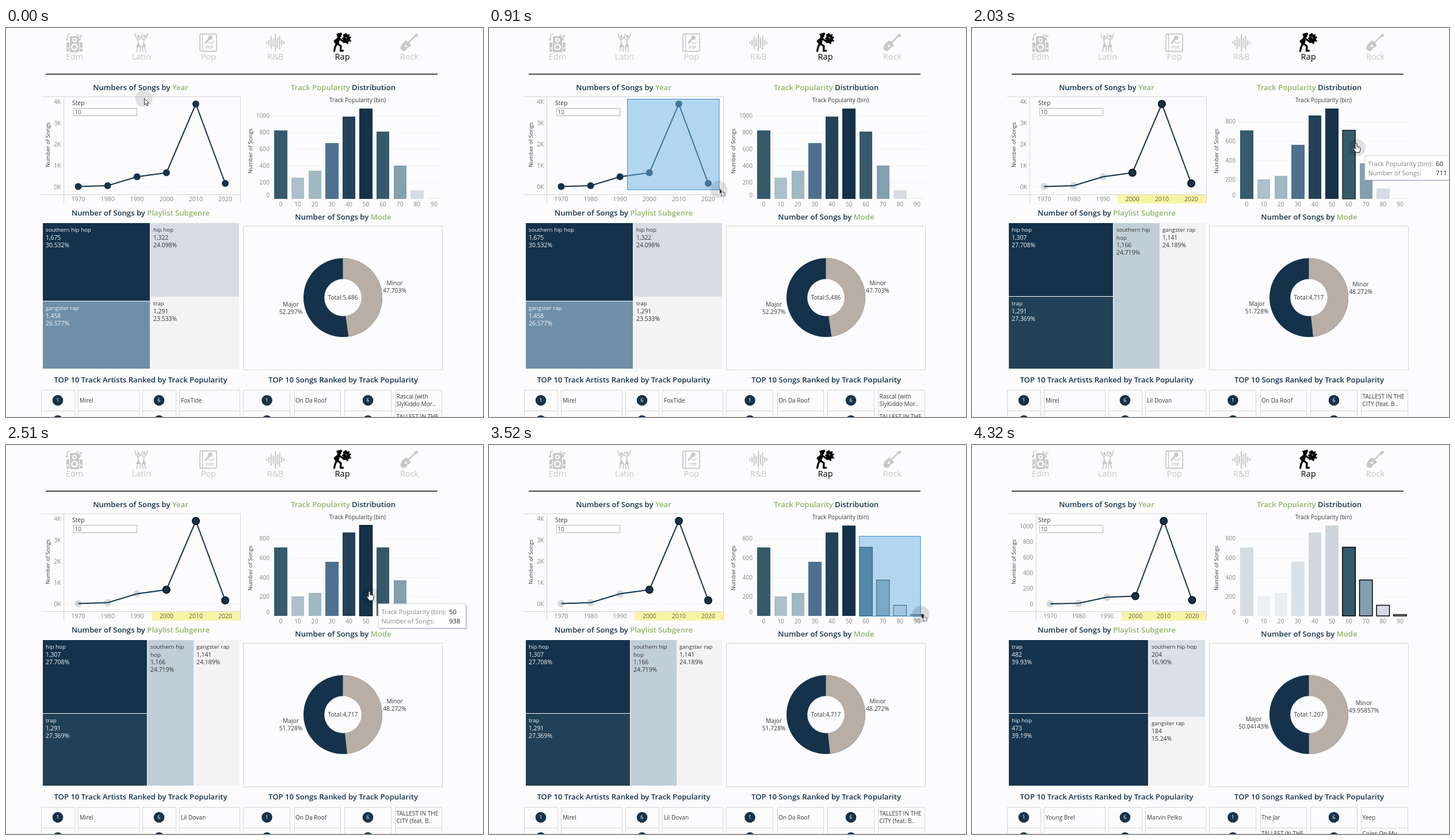
Write an HTML page that moves like this. It is 829 px wide and 676 px high and loops after 4900 ms.

```html
<!DOCTYPE html>
<html lang="en">
<head>
<meta charset="utf-8">
<title>Song dashboard</title>
<style>
html, body { margin: 0; width: 100%; height: 100%; overflow: hidden; background: #fcfcfe; }
svg { display: block; width: 829px; height: 676px; font-family: "Open Sans", "Noto Sans", sans-serif; }
.crisp { shape-rendering: crispEdges; }
.halo { stroke: #fcfcfe; stroke-width: 2; paint-order: stroke; }
</style>
</head>
<body>
<svg viewBox="0 0 829 676"><g id="base"></g><g id="live"></g></svg>
<script>
const LOOP = 4900, NAVY = '#15324a', GREEN = '#8fb568', TAN = '#b8aea5', LINE = '#d4d4d6', GREY = '#858585', INK = '#3a3a3e';

const lerp = (a, b, p) => a + (b - a) * p;
const mixAll = (a, b, p) => a.map((v, i) => lerp(v, b[i], p));
const clamp01 = v => Math.max(0, Math.min(1, v));
const smooth = v => v * v * (3 - 2 * v);
const easeInOut = x => x < .5 ? 4 * x ** 3 : 1 - 4 * (1 - x) ** 3;
const rgb = hex => [1, 3, 5].map(i => parseInt(hex.slice(i, i + 2), 16));
const mixHex = (a, b, p) => `rgb(${mixAll(rgb(a), rgb(b), p).map(Math.round)})`;
const esc = s => String(s).replace(/&/g, '&amp;');

const text = (x, y, s, size, fill = INK, anchor = 'start', more = '') =>
  `<text x="${x}" y="${y}" font-size="${size}" fill="${fill}" text-anchor="${anchor}" ${more}>${esc(s)}</text>`;
const rect = (x, y, w, h, fill, more = '') =>
  `<rect x="${x}" y="${y}" width="${Math.max(0, w)}" height="${Math.max(0, h)}" fill="${fill}" ${more}/>`;
const circle = (x, y, r, fill, more = '') => `<circle cx="${x}" cy="${y}" r="${r}" fill="${fill}" ${more}/>`;
const path = (d, stroke, w = 1, fill = 'none', more = '') =>
  `<path d="${d}" stroke="${stroke}" stroke-width="${w}" fill="${fill}" ${more}/>`;
const title = (x, y, parts) => `<text x="${x}" y="${y}" font-size="13.15" font-weight="600" text-anchor="middle">` +
  parts.map(([s, c]) => `<tspan fill="${c}">${s}</tspan>`).join('') + '</text>';

// ---- data for the three filter states ----
const SUBGENRES = ['trap', 'southern hip hop', 'hip hop', 'gangster rap'];
const TREES = [
  [[[251, 467.5, 405, 592], '#f3f3f4', '1,291', '23.533%'],
   [[64, 339, 250, 474], '#15324a', '1,675', '30.532%'],
   [[251, 339, 405, 467], '#d7dbe6', '1,322', '24.098%'],
   [[64, 475, 250, 592], '#6f8fa8', '1,458', '26.577%']],
  [[[64, 467, 245, 592], '#224056', '1,291', '27.369%'],
   [[246, 339, 326, 592], '#c0ced7', '1,166', '24.719%'],
   [[64, 339, 245, 466], '#15324a', '1,307', '27.708%'],
   [[326, 339, 405, 592], '#f3f3f4', '1,141', '24.189%']],
  [[[64, 339, 306, 466], '#15324a', '482', '39.93%'],
   [[307, 339, 405, 472], '#d9e0e8', '204', '16.90%'],
   [[64, 467, 306, 592], '#183650', '473', '39.19%'],
   [[307, 472, 405, 592], '#f3f3f4', '184', '15.24%']]
];
const BARS_ALL = [825, 256, 340, 672, 991, 1091, 811, 402, 106, 14];
const BARS_SEL = [707, 203, 239, 560, 863, 938, 711, 372, 110, 14];
const BAR_TINT = ['#365a6b', '#adc0cc', '#a0b8c1', '#4e708e', '#234158', NAVY, '#365a6b', '#84a0ae', '#d7dbe6', '#f3efe8'];
const LINES = [
  { axis: 100, x: [125.5, 51.1], y: [275.5, 274, 258.5, 251.5, 132, 270], ticks: ['0K', '1K', '2K', '3K', '4K'], gap: 36.9 },
  { axis: 111, x: [136, 49.3], y: [276, 275, 264.5, 262.5, 132, 269.5], ticks: [0, 200, 400, 600, 800, 1000], gap: 26.95 }
];
const DONUTS = [
  { minor: .47703, total: '5,486', major: ['52.297%', 495, 484], min: ['47.703%', 675.5, 447] },
  { minor: .48272, total: '4,717', major: ['51.728%', 495, 483], min: ['48.272%', 675.5, 448.5] },
  { minor: .4995857, total: '1,207', major: ['50.04143%', 489.5, 480], min: ['49.95857%', 681, 452] }
];
const TALL = ['TALLEST IN THE', 'CITY (feat. B..'];
// first row of the four columns, then any second row that peeks in
const LISTS = [
  { top: [['Mirel'], ['FoxTide'], ['On Da Roof'], ['Rascal (with', 'SlyKiddo Mor..']], next: [678.5, TALL[0], 679] },
  { top: [['Mirel'], ['Lil Dovan'], ['On Da Roof'], TALL] },
  { top: [['Young Brel'], ['Marvin Pelko'], ['The Jar'], ['Yeep']], next: [678.5, 'Coins On My..', 679], left: [503, TALL[0], 679] }
];
const BADGE_X = [90, 266, 453.5, 629], NAME_X = [128, 304, 503, 678.5];

// ---- fixed parts ----
function icons() {
  const g = '#c8c8c8', w = '#fcfcfe', k = '#000', round = 'stroke-linejoin="round" stroke-linecap="round"';
  let s = rect(111, 14, 16, 28, g, 'rx="2"') + circle(119, 21, 4, w) + circle(119, 21, 2, g) + circle(119, 33, 6, w) + circle(119, 33, 3.5, g);
  s += rect(105, 25, 5, 16, g) + rect(128, 25, 5, 16, g) + circle(107.5, 35, 1.6, w) + circle(130.5, 35, 1.6, w);
  s += path('M107 20V12l5-2M129 20v-7l4 2M122 12h5', g, 1.6) + circle(106, 20, 2, g) + circle(128, 20, 2, g);
  s += circle(230, 15, 2.4, g) + circle(240.5, 14.5, 2.4, g);
  s += path('M224 10l2 7 4 3 4-3 3-6M246 10l-2 7-4 3-4-2M229 20l1 8-3 13M231 28l3 5-1 8M240 20l-1 8 4 13M239 28l-2 6 1 7', g, 1.7, 'none', round);
  s += path('M230 25l-3.5 8h7zM239.5 25l-3 8h7z', g, .6, g);
  s += rect(337, 10.5, 29, 30, 'none', `rx="2" stroke="${g}" stroke-width="1.8"`) + path('M341.5 10v30', g, 1.5);
  s += circle(355, 17, 3.8, g) + path('M353 19l-7 8', g, 3) + path('M352 24q6 6 9-1', g, 1.2);
  s += text(354, 36, 'POP', 6.5, g, 'middle', 'font-weight="700"');
  [5, 10, 22, 14, 31, 18, 25, 10, 5].forEach((h, i) => s += rect(452.3 + i * 3.7, 25.5 - h / 2, 2.1, h, g, 'rx="1"'));
  s += circle(579, 13, 3.8, k) + path('M574 11l9-2.5 1 3z', k, 1, k);
  s += path('M578 18L575.5 27', k, 5.5, 'none', round) + path('M577 18l-6 5 3 4', k, 3, 'none', round);
  s += path('M575 27l-3 6-1.5 7M576 27l6 4.5-.5 8h4M580 19l6 4 4-2', k, 3.3, 'none', round);
  s += path('M586 12l5-3 2 3 4-1-1 4 4 1-3 3 3 4-5 0-1 5-4-3-4 1 1-5-3-3 3-2z', k, .8, k) + path('M590 16l3 2', w, 1);
  s += path('M698 27l14-14', g, 2.6) + path('M710 12l4-2 2 3-4 3z', g, 1, g);
  s += path('M692 25q2-4 5-2l6 6q0 4-4 4-2 0-3 4-3 4-7 2-5-2-2-8 1-4 5-6z', g, 1, g) + circle(695, 31, 2, w);
  return s;
}

const axisName = (x, y) => text(0, 0, 'Number of Songs', 9.6, INK, 'middle', `transform="translate(${x} ${y}) rotate(-90)"`);

function base() {
  let s = rect(0, 0, 829, 676, '#fcfcfe') + icons();
  ['Edm', 'Latin', 'Pop', 'R&B', 'Rap', 'Rock'].forEach((n, i) =>
    s += text(119 + i * 116.4, 55, n, 14.6, n === 'Rap' ? '#000' : '#c6c6c6', 'middle'));
  s += rect(69, 79.5, 681, 1.5, '#111');
  s += title(234, 108, [['Numbers of Songs by ', NAVY], ['Year', GREEN]]);
  s += title(586, 108, [['Track Popularity', GREEN], [' Distribution', NAVY]]);
  s += title(234, 325.5, [['Number of Songs by ', NAVY], ['Playlist Subgenre', GREEN]]);
  s += title(586, 333, [['Number of Songs by ', NAVY], ['Mode', GREEN]]);
  s += title(234, 616, [['TOP 10 Track Artists Ranked by Track Popularity', NAVY]]);
  s += title(586, 616, [['TOP 10 Songs Ranked by Track Popularity', NAVY]]);
  s += path('M61 119.5H407M61 289.5H407M407.5 119V304', LINE);
  s += text(115, 133.5, 'Step', 10.4) + rect(117.5, 139.5, 110, 13, '#fff', 'stroke="#b4b4b4"') + text(119.5, 150, '10', 10, '#555');
  s += axisName(76, 203);
  s += text(611, 129.3, 'Track Popularity (bin)', 10, INK, 'middle');
  s += rect(412.5, 344.5, 346, 249.5, 'none', `stroke="${LINE}"`);
  [[61, 120], [125, 232], [237, 296], [301, 407], [412, 494], [501, 582], [588, 670], [676, 758]].forEach(([a, b]) =>
    s += path(`M${a + .5} 675V629.5H${b - .5}V675M${a} 665.5H${b}`, LINE));
  return s + rect(0, 674.5, 829, 1, '#eeebe2');
}

// ---- changing parts ----
function lineChart(p, selected) {
  const [A, B] = LINES, L = p < .5 ? A : B;
  const axis = lerp(A.axis, B.axis, p), [x0, dx] = mixAll(A.x, B.x, p), ys = mixAll(A.y, B.y, p);
  const xs = ys.map((_, i) => x0 + dx * i);
  let s = path(`M${axis + .5} 119V304.5`, LINE) + path(`M${axis} 276.5H407`, '#ececf0', 1, 'none', 'stroke-dasharray="2 2"');
  if (selected) s += rect(xs[3] - dx / 2, 290, 407 - xs[3] + dx / 2, 15, '#f8f4a6');
  L.ticks.forEach((v, i) => s += text(axis - 4.5, 279.5 - i * L.gap, v, 10.4, GREY, 'end'));
  const dot = i => circle(xs[i], ys[i], selected ? 6.3 : 6, selected && i < 3 ? '#d3d8de' : NAVY,
    selected && i > 2 ? 'stroke="#000" stroke-width="1.3"' : '');
  const all = [0, 1, 2, 3, 4, 5];
  const joined = path('M' + xs.map((x, i) => x + ' ' + ys[i]).join('L'), NAVY, 2);
  s += selected ? all.slice(0, 3).map(dot).join('') + joined + all.slice(3).map(dot).join('') : joined + all.map(dot).join('');
  xs.forEach((x, i) => s += text(x, 301, 1970 + i * 10, 10.6, selected && i > 2 ? '#66664e' : GREY, 'middle'));
  return s;
}

const barX = i => 466.3 + 29.6 * i;
const selBarTop = i => 297 - BARS_SEL[i] / 938 * 157.5;

function barChart(x, p, dim, hover, dragX) {
  const vals = mixAll(BARS_ALL, BARS_SEL, p), max = lerp(1091, 938, p), moving = p > 0 && p < 1;
  const labelMax = lerp(1091, 938, x), unit = 200 + (moving ? 7.8083 * (1 - p) : 0);
  let s = text(458, 294.3, 0, 10.2, GREY, 'end') + (moving ? '' : axisName(428, 214));
  for (let k = 1; k <= (p === 1 ? 4 : 5); k++) {
    const gy = 297 - k * unit / max * 157.5;
    if (gy > 139) s += rect(463, gy, 297, 1, '#f0f0f5');
    s += text(458, Math.max(139, 297 - k * unit / labelMax * 157.5) + 3.8, +(k * unit).toPrecision(6), 10.2, GREY, 'end');
  }
  vals.forEach((v, i) => {
    const h = v / max * 157.5, on = i > 5;
    const framed = i === hover || on && (dim > 0 || dragX > barX(i));
    const edge = framed ? `stroke="#000" stroke-width="${dim > 0 ? 1.5 : 1}"` : 'class="crisp"';
    s += rect(barX(i), 297 - h, 22.4, h, on ? BAR_TINT[i] : mixHex(BAR_TINT[i], '#fcfcfe', .8 * dim), edge);
    s += text(barX(i) + 11.2, 310, i * 10, 10.2, GREY, 'middle');
  });
  return s;
}

function treemap(a, b, p, settled) {
  return SUBGENRES.map((name, i) => {
    const A = TREES[a][i], B = TREES[b][i], [x0, y0, x1, y1] = mixAll(A[0], B[0], p).map(Math.floor);
    let s = rect(x0, y0, x1 - x0, y1 - y0, mixHex(A[1], B[1], p), `class="crisp${settled ? '' : ' halo'}"`);
    if (!settled) return s;
    const lines = b === 1 && i === 1 ? ['southern hip', 'hop'] : [name];
    const ink = rgb(B[1])[0] < 130 ? '#f4f6f8' : '#333';
    lines.concat(B[2], B[3]).forEach((v, k) =>
      s += text(x0 + 5, y0 + 15.3 + k * 13.3, v, k < lines.length ? 9.8 : 10.4, ink));
    return s;
  }).join('');
}

function donut(a, b, p, settled) {
  const D = DONUTS[b], ang = lerp(DONUTS[a].minor, D.minor, p) * 2 * Math.PI;
  const cx = 585.5, cy = 468.5, R = 68.5;
  let s = circle(cx, cy, R, NAVY);
  s += path(`M${cx} ${cy}V${cy - R}A${R} ${R} 0 0 1 ${cx + R * Math.sin(ang)} ${cy - R * Math.cos(ang)}Z`, 'none', 0, TAN);
  s += circle(cx, cy, 32.3, '#fcfcfe');
  if (!settled) return s;
  s += text(cx, 472.3, 'Total:' + D.total, 10.3, INK, 'middle');
  [['Major', D.major], ['Minor', D.min]].forEach(([n, [v, x, y]]) =>
    s += text(x, y, n, 10.3, INK, 'middle') + text(x, y + 13.4, v, 10.3, INK, 'middle'));
  return s;
}

function lists(b, p, settled) {
  const L = LISTS[b], rise = [0, 108, 0, 60];
  let s = '';
  BADGE_X.forEach((x, i) => {
    s += circle(x, 647 + rise[i] * (1 - p), 9.3, NAVY);
    if (settled || i === 2) s += circle(x, 682.3, 9.3, NAVY);
    if (settled) s += text(x, 650.3, i % 2 ? 6 : 1, 9.2, '#fff', 'middle');
    const rows = L.top[i];
    rows.forEach((r, k) => s += text(NAME_X[i], (rows.length > 1 ? 643.7 : 650.7) + k * 13.4, r, 10.1));
  });
  [L.next, L.left].forEach(n => { if (n && settled) s += text(n[0], n[2], n[1], 10.1); });
  return s;
}

function toolbar(x, y, count, total) {
  const g = '#666';
  let s = rect(x + 2, y + 2, 273, 39, 'rgba(60,60,90,.16)') + rect(x, y, 273, 39, '#f8f8fa', 'stroke="#c9c9d2"');
  s += path(`M${x + 6} ${y + 11}l2.5 3 4-7`, g, 1.2) + text(x + 16, y + 14.8, 'Keep Only', 10.7);
  s += circle(x + 83, y + 11, 3.4, 'none', `stroke="${g}"`) + path(`M${x + 80.6} ${y + 13.4}l4.8-4.8`, g) + text(x + 91, y + 14.8, 'Exclude', 10.7);
  s += path(`M${x + 142} ${y + 8}h8l2 2-2 2h-8zM${x + 146} ${y + 12}v5`, g);
  s += circle(x + 172, y + 10, 2.4, 'none', `stroke="${g}"`) + circle(x + 175, y + 12, 2.4, 'none', `stroke="${g}"`) + path(`M${x + 181} ${y + 10}h5l-2.5 3z`, 'none', 0, '#222');
  for (let i = 0; i < 3; i++) s += rect(x + 197.5 + i * 3, y + 7.5, 1.8, 7, g);
  s += text(x + 6, y + 34.5, count, 9.6, INK, 'start', 'font-weight="700"') + text(x + 15, y + 34.5, 'items selected', 9.6, '#555');
  s += text(x + 85, y + 34.5, '·', 9.6) + text(x + 91.5, y + 34.5, 'SUM of AGG(Number of Songs):', 9.6, '#555');
  return s + text(x + 265, y + 34.5, total, 9.8, INK, 'end', 'font-weight="600"');
}

function tooltip(x, y, i) {
  let s = rect(x + 2, y + 2, 152, 42, 'rgba(70,70,120,.3)') + rect(x, y, 152, 42, '#fff', 'stroke="#cfcfdd"');
  s += text(x + 5.5, y + 18, 'Track Popularity (bin):', 11.2, '#848488') + text(x + 5.5, y + 33.5, 'Number of Songs:', 11, '#848488');
  return s + text(x + 123, y + 18, i * 10, 11.3, '#222') + text(x + 123, y + 33.5, BARS_SEL[i], 11.3, '#222');
}

function marquee(x, y, x2, y2) {
  return rect(x + .5, y + .5, x2 - x, y2 - y, 'rgba(110,180,225,.515)', 'stroke="#3a8fd4"');
}

function pointer(x, y, kind, pressed) {
  let s = circle(x, y, 15, `rgba(0,0,0,${pressed ? .13 : .105})`);
  if (kind === 'hand')
    return s + path(`M${x - 3} ${y - 7}q1.5-1.5 3 0v5l5 1.3q1.5 1 1 4l-1.5 5h-6l-5-6.5q1-2 3.5 0z`, '#111', 1, '#fff', 'stroke-linejoin="round"');
  if (kind === 'cross')
    return s + path(`M${x + 1.5} ${y - 1}v8l4-3.6z`, 'none', 0, '#111') + rect(x + 4, y + 5, 6.5, 6.5, 'none', 'stroke="#222" stroke-dasharray="1.2 1"');
  return s + path(`M${x + 1} ${y}v11l2.6-2.4 1.9 4 1.9-.9-1.9-3.8h3.4z`, '#222', .9, '#fff');
}

const PATH = [[210, 239.5, 122.5], [750, 399.5, 280.5], [1650, 400, 281], [2030, 669, 208], [2190, 650, 266], [2510, 633, 262],
  [2720, 637, 254], [2930, 643, 158], [3250, 735, 285], [3310, 735, 285], [3520, 750.5, 294.5], [4050, 750.5, 294.5], [4210, 860, 315]];

function place(t) {
  const i = PATH.findIndex(k => k[0] > t);
  if (i === 0) return PATH[0].slice(1);
  if (i < 0) return PATH[PATH.length - 1].slice(1);
  const [a, b] = [PATH[i - 1], PATH[i]];
  return mixAll(a, b, smooth((t - a[0]) / (b[0] - a[0]))).slice(1);
}

function draw(t) {
  const late = t >= 3790, changed = t >= 1230;
  const a = late ? 1 : 0, b = late ? 2 : changed ? 1 : 0;
  const since = late ? t - 3790 : t - 1230, settled = !changed || since >= 255;
  const x = settled ? 1 : clamp01(since / 290), p = settled ? 1 : easeInOut(x);
  const [cx, cy] = place(t);
  const drag1 = t >= 270 && t < 1230, drag2 = t > 2930 && t < 3790;

  let hover = -1;
  if (t >= 1710 && t <= 2930) for (let i = 0; i < 10; i++) {
    const dx = cx - 3 - barX(i);
    if (dx >= 0 && dx <= 22.4 && cy - 6 > selBarTop(i)) hover = i;
  }
  let s = lineChart(late ? p : 0, changed);
  s += barChart(late ? 1 : changed ? x : 0, late ? 1 : changed ? p : 0, late ? p : 0, hover, drag2 ? cx : 0);
  s += treemap(a, b, p, settled) + donut(a, b, p, settled) + lists(b, p, settled);
  if (drag1) s += marquee(240, 123, cx, cy);
  if (drag2) s += marquee(643, 158, cx - 1, Math.min(297, cy + 2.5));
  if (t >= 1340 && t < 1820) s += toolbar(414, 290, 6, '4,717');
  if (t >= 3900 && t < 4320) s += toolbar(764.5, 302, 4, '1,207');
  const pressed = t >= 50 && t < 910 || drag2;
  if (t < 4210) s += pointer(cx, cy, drag1 || drag2 ? 'cross' : hover >= 0 ? 'hand' : 'arrow', pressed);
  if (hover >= 0) s += tooltip(cx + 14, cy + 14, hover);
  return s;
}

function tick(t) {
  const at = k => Math.round(k * 16 / 3) * 10;
  const k = Math.floor((t + 6) * 3 / 160);
  return at(k) > t ? at(k - 1) : at(k);
}

const live = document.getElementById('live');
document.getElementById('base').innerHTML = base();
const start = performance.now();
let shown = -1;
function frame() {
  const t = tick((performance.now() - start) % LOOP);
  if (t !== shown) live.innerHTML = draw(shown = t);
  requestAnimationFrame(frame);
}
frame();
</script>
</body>
</html>
```
